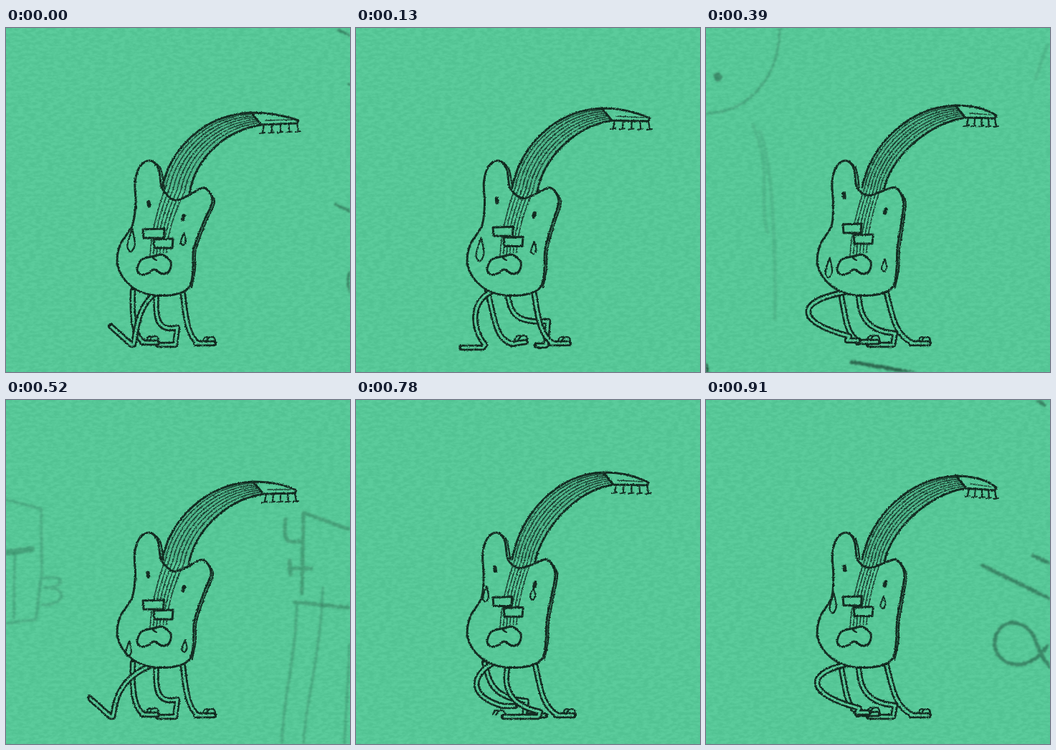
Write an HTML page that moves like this. It is 480 px wide and 480 px high and loops after 1040 ms.

```html
<!DOCTYPE html>
<html lang="en">
<head>
<meta charset="utf-8">
<title>Weeping guitar walk</title>
<style>
  html, body { margin: 0; width: 100%; height: 100%; overflow: hidden; background: #57c898; }
  svg { display: block; width: 100vw; height: 100vh; }
  .pose { visibility: hidden; animation: show 1040ms step-end infinite; }
  .pose path { fill: none; stroke: #10291f; stroke-width: 3; stroke-linecap: round; stroke-linejoin: round; }
  .pose .skin { fill: #56cb99; }
  .pose .eye { stroke-width: 5.4; }
  .pose .fine { stroke-width: 1.6; opacity: .85; }
  .pose .thin { stroke-width: 2.2; }
  .pose .shade { fill: #10291f; stroke: none; opacity: .1; }
  .pose .limb { stroke-width: 8.4; }
  .pose .hollow { stroke: #56cb99; stroke-width: 3.2; stroke-linecap: butt; }
  @keyframes show {
    0% { visibility: visible; }
    12.5%, 100% { visibility: hidden; }
  }
</style>
</head>
<body>
<svg viewBox="0 0 480 480">
  <defs>
    <filter id="pencil" filterUnits="userSpaceOnUse" x="0" y="0" width="480" height="480" color-interpolation-filters="sRGB">
      <feTurbulence type="fractalNoise" baseFrequency=".55" numOctaves="2" seed="4"/>
      <feDisplacementMap in="SourceGraphic" scale="3" xChannelSelector="R" yChannelSelector="G"/>
    </filter>
    <filter id="smudge" filterUnits="userSpaceOnUse" x="0" y="0" width="480" height="480" color-interpolation-filters="sRGB">
      <feTurbulence type="fractalNoise" baseFrequency=".4" numOctaves="2" seed="9"/>
      <feDisplacementMap in="SourceGraphic" scale="5" xChannelSelector="R" yChannelSelector="G"/>
      <feGaussianBlur stdDeviation=".9"/>
    </filter>
    <filter id="paper" filterUnits="userSpaceOnUse" x="0" y="0" width="480" height="480" color-interpolation-filters="sRGB">
      <feTurbulence type="fractalNoise" baseFrequency=".12 .25" numOctaves="3" seed="2"/>
      <feColorMatrix values="3 0 0 0 -1  3 0 0 0 -1  3 0 0 0 -1  0 0 0 0 .035"/>
    </filter>
  </defs>
  <rect width="480" height="480" fill="#56cb99"/>
  <g id="poses"></g>
  <rect width="480" height="480" filter="url(#paper)"/>
</svg>
<script>
const STEP = 130, COUNT = 8, FALL = 8;
const lerp = (a, b, t) => a + (b - a) * t;
const mix = (a, b, t) => a.map((v, i) => lerp(v, b[i], t));
const shift = (pts, dx, dy) => pts.map(([x, y]) => [x + dx, y + dy]);
const points = s => s.split(' ').map(p => p.split(',').map(Number));
const path = (d, cls = '') => `<path class="${cls}" d="${d}"/>`;

// Catmull-Rom spline as bezier segments
function smooth(pts, closed) {
  const n = pts.length;
  const at = i => closed ? pts[(i + n) % n] : pts[Math.max(0, Math.min(n - 1, i))];
  let d = 'M' + pts[0];
  for (let i = 0; i < (closed ? n : n - 1); i++) {
    const [a, b, c, e] = [-1, 0, 1, 2].map(k => at(i + k));
    d += `C${b.map((v, k) => v + (c[k] - a[k]) / 6)} ${c.map((v, k) => v - (e[k] - b[k]) / 6)} ${c}`;
  }
  return d + (closed ? 'Z' : '');
}

const outline = points('218,224 213,197 201,185 187,193 180,215 181,245 176,276 159,303 156,332 172,358 '
  + '200,372 235,372 256,361 261,335 262,308 276,270 288,241 276,223 254,234 235,240');
const lips = points('-.5,.2 -.36,-.25 -.05,-.4 .25,-.48 .48,-.1 .42,.35 .2,.45 0,.25 -.2,.45 -.42,.48');

// leaning pulls the shoulders left, lifts the neck seat and pushes the hip right
function bend([x, y], lean) {
  const high = Math.max(0, Math.min(1, (300 - y) / 60));
  const dx = (1 - high) * (x - 156) / 21 - high * (4 + (x - 180) / 12);
  const dy = -8 * high * Math.exp(-(((x - 243) / 18) ** 2));
  return [x + lean * dx, y + lean * dy];
}

const box = (x, y, w, h) => path(`M${x} ${y + 1}l${w} -1l-1 ${h}l${2 - w} 0Z`, 'skin');

function drop(x, y, w, h) {
  const tip = [x + w * .15, y - h / 2];
  return path(smooth([tip, [x - w * .3, y], [x - w * .42, y + h * .3], [x, y + h / 2],
    [x + w * .45, y + h * .22], [x + w * .38, y - h * .1], tip]), 'thin');
}

// each eye lets go of one drop per loop, starting on the blink
function tears(step) {
  const n = (step + 3) % FALL;
  const left = k => {
    const h = 15 + 18 * Math.sin(Math.PI * k / FALL);
    return drop(187 - 17 * (1 - Math.exp(-.45 * k)), 258 + 12.75 * k, 2 + h * .31, h);
  };
  const right = k => drop(246 + k * .4, 258 + 12.2 * k, 8, 17);
  return n ? left(n) + right(n) : left(0) + left(FALL) + right(FALL);
}

function face(lean, step) {
  const l = [199 - 6.5 * lean, 246 - 12 * lean], r = [247 + 3 * lean, 265 - 9 * lean];
  const eyes = step === 5
    ? path(`M${l[0] - 8} ${l[1] - 3}q5 8 15 8M${r[0] - 7} ${r[1] + 1}q6 4 13 0`)
    : path(`M${l[0]} ${l[1] - 3}l.5 5M${r[0] + 1} ${r[1] - 3}l-1.5 5`, 'eye');
  const w = 48, h = 28, x = 207, y = 330;
  return eyes + path(smooth(lips.map(([u, v]) => [x + u * w, y + v * h]), true), 'skin')
    + path(`M${x - 3} ${y - 11}q2 4 6 5`, 'thin') + tears(step);
}

// neck edges as four bezier points each
function edges(lean, nx, ny) {
  const seat = [256 - 8 * lean, 230 - 3 * lean], low = [nx + 14, ny + 17];
  return [
    [[218, 222], [230, lerp(222, ny, .52)], [nx - 66, ny + 3], [nx, ny]],
    [seat, [seat[0] + 8, seat[1] - 45], [low[0] - 55, low[1] + 9], low]
  ];
}
const curve = ([a, b, c, d]) => `${a}C${b} ${c} ${d}`;

function neck([outer, inner], tip) {
  const nut = outer[3], low = inner[3], under = [tip[0] - 2, tip[1] + 4];
  let s = path(`M${curve(outer)}L${curve([...inner].reverse())}Z`, 'shade')
    + path('M' + curve(outer)) + path('M' + curve(inner))
    + path(`M${nut}Q${nut[0] + 36} ${nut[1]} ${tip}L${under}L${low}Z`)
    + path(`M${low[0] + 6} ${low[1] - 6}L${tip[0] - 8} ${tip[1] - 1}`, 'fine');
  for (let i = 0; i < 5; i++) {
    const [x, y] = mix([low[0] + 4, low[1]], under, i / 4);
    s += path(`M${x} ${y}l${i - 2} 11m-4 1l7-1`, 'thin');
  }
  return s;
}

function strings([outer, inner]) {
  let s = '';
  for (let i = 0; i < 6; i++) {
    const c = outer.map((p, k) => mix(p, inner[k], .12 + i * .14));
    const x = 201 + i * 4.6;
    s += path(`M${x} ${318 - i}Q${x + 2} 275 ${curve(c)}`, 'fine');
  }
  return s;
}

// key legs per phase: hip x, knee x y, ankle x y, toe x y
const gait = [
  [[210, 208, 412, 239, 418, 212, 442], [177, 176, 412, 193, 439, 211, 439], [214, 182, 405, 178, 442, 146, 416]],
  [[210, 216, 403, 268, 409, 252, 443], [183, 193, 418, 220, 441, 237, 438], [193, 160, 398, 180, 442, 147, 446]],
  [[179, 186, 402, 238, 420, 264, 440], [213, 206, 408, 257, 435, 206, 442], [193, 158, 400, 206, 427, 222, 427]],
  [[212, 215, 407, 264, 426, 227, 442], [187, 194, 412, 214, 437, 240, 438], [210, 122, 394, 200, 430, 213, 436]]
];
const lead = q => [246 + 1.5 * q, 250 + 3 * q, 408, 268 + 7 * q, 440, 290 + 7 * q, 440];

function leg([hip, kx, ky, ax, ay, tx, ty], bare) {
  const s = (ay - 366) / 4;
  const d = `M${hip} 366C${kx} ${ky - s} ${kx} ${ky + s} ${ax} ${ay}L${ax - 3} ${Math.max(ay, ty)}L${tx} ${ty}`;
  const toes = bare ? path(`M${tx - 15} ${ty - 3}q2-8 8-5q-3 4-4 6m4-6q8-3 9 4`, 'thin') : '';
  return path(d, 'limb') + path(d, 'hollow') + toes;
}

// reach moves the trailing leg sideways
function legs(phase, reach) {
  const [far, near, [hip, kx, ky, ax, ay, tx, ty]] = gait[phase];
  const trail = [hip, kx + reach, ky, ax + reach, ay, tx + reach, ty];
  return leg(far) + leg(near, true) + leg(trail) + leg(lead(phase), true);
}

function guitar({ lean, nut, tip, reach = 0 }, step) {
  const body = outline.map(p => bend(p, lean)), rim = edges(lean, ...nut);
  return legs(step % 4, reach) + neck(rim, tip)
    + path(smooth(body, true), 'skin')
    + path(smooth(shift(body.slice(12, 18), 3, 1)), 'thin')
    + path(smooth(shift(body.slice(0, 3), 3, 0)), 'thin')
    + strings(rim)
    + box(191, 280 - 7 * lean, 30 - 4 * lean, 13) + box(206, 294 - 6 * lean, 27, 13)
    + face(lean, step);
}

const walk = [
  { lean: 0, nut: [342, 118], tip: [408, 129] },
  { lean: .4, nut: [343, 112], tip: [410, 126] },
  { lean: .75, nut: [345, 106], tip: [411, 122] },
  { lean: 1, nut: [348, 108], tip: [405, 122] },
  { lean: .15, nut: [345, 114], tip: [405, 126], reach: -29 },
  { lean: .6, nut: [342, 95], tip: [410, 106] },
  { lean: .8, nut: [345, 101], tip: [408, 115] },
  { lean: .9, nut: [349, 106], tip: [405, 122], reach: 14 }
];

const mark = (d, width, alpha) => `<path d="${d}" style="stroke-width:${width};opacity:${alpha}"/>`;
const scribble = (x, y) => `M${x} ${y}l95 47M${x + 70} ${y - 14}l40 18M${x + 90} ${y + 112}`
  + 'c-25 40-72 30-73-3c0-34 37-38 53-13c8 18 14 40 28 48';
const scenery = {
  0: mark(scribble(460, 246), 4, .38) + mark('M464 3l18 8M478 78l4 3', 4, .4),
  2: mark('M23 85L28 154', 23, .92) + mark('M-6 124L28 157', 20, .92)
    + mark('M-4 198C16 199 29 216 26 241', 21, .92) + mark('M24 -2l9 4M0 62l-1 12', 7, .85),
  3: mark('M103 0C102 70 60 118 0 119', 3.5, .2) + mark('M16 67l1 2', 11, .38)
    + mark('M65 135C95 200 72 240 86 285M76 145C92 190 98 300 96 405M476 25l-16 45', 5, .1)
    + mark('M203 466l87 15', 5, .6) + mark('M-1 470l2 11', 7, .85),
  4: mark('M0 139l49 13l1 88l-8 66l-42 6M12 215l-1 90M50 249c38-7 30 14 4 13c32-2 32 24-4 24', 4, .16)
    + mark('M0 213l36-5', 8, .24)
    + mark('M413 270l2-113l65 24M390 166c-4 39 5 31 24 31M396 224l1 19M394 235h32M402 282l79 8', 5, .25)
    + mark('M406 287C404 360 386 420 385 481M442 262C440 350 418 420 415 481M480 340l-8 140', 4, .18),
  5: mark('M298 3l7-5M0 328C10 355 7 380 0 402', 4, .13),
  7: mark(scribble(386, 231), 5, .42) + mark('M463 0l9 7', 5, .42)
};

document.getElementById('poses').innerHTML = walk.map((pose, i) =>
  `<g class="pose" style="animation-delay:${(i - COUNT) * STEP}ms">`
  + `<g filter="url(#smudge)">${scenery[i] || ''}</g>`
  + `<g filter="url(#pencil)">${guitar(pose, i)}</g></g>`).join('');
</script>
</body>
</html>
```
